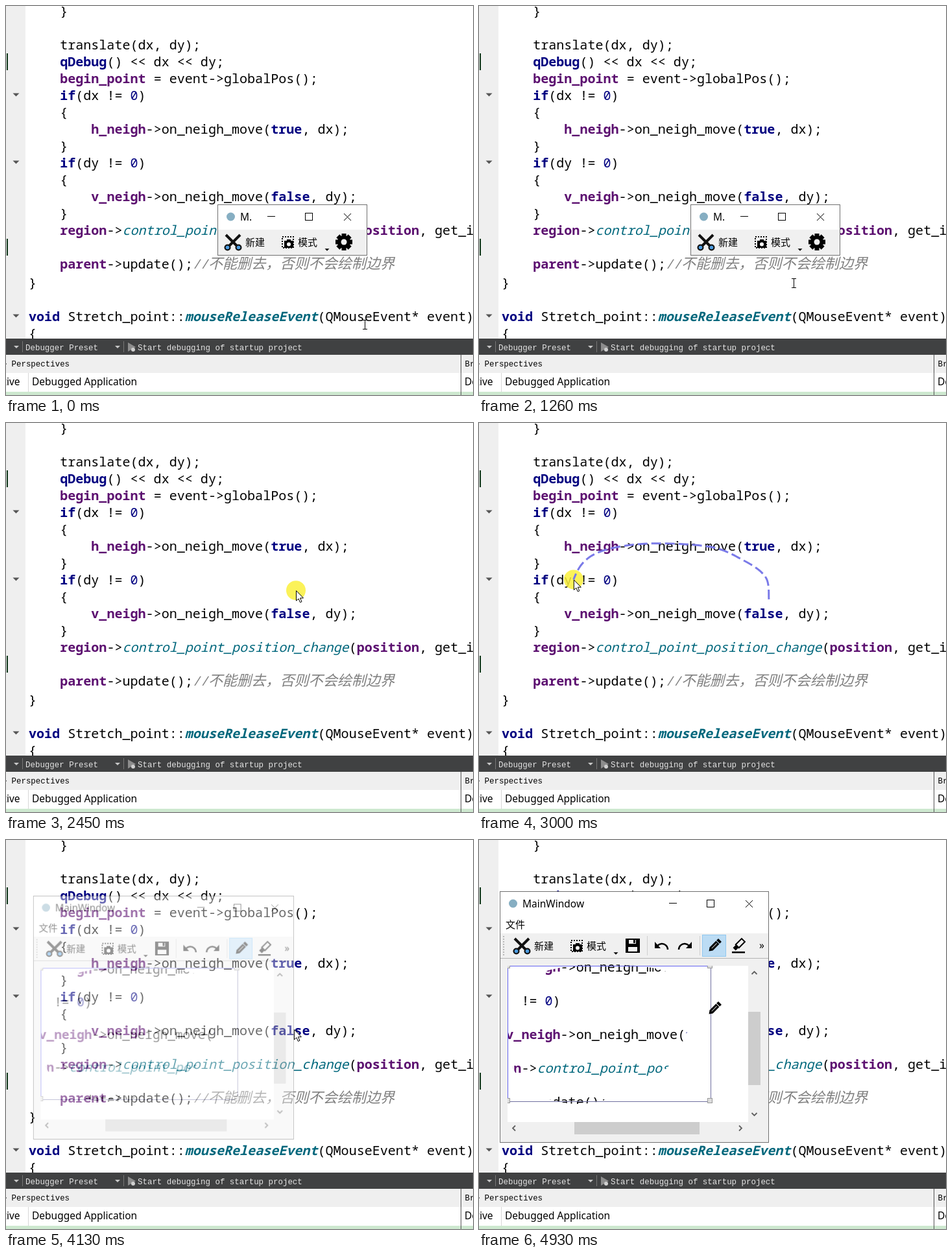
These frames come from a looping animation (720 by 600 pixels, 5.33 s). An HTML page with a canvas:

```html
<!DOCTYPE html>
<html lang="en">
<head>
<meta charset="utf-8">
<title>Screen cut-out</title>
<style>
html, body { margin: 0; width: 100%; height: 100%; overflow: hidden; background: #fff; }
canvas { display: block; width: 720px; height: 600px; }
</style>
</head>
<body>
<canvas id="stage" width="720" height="600"></canvas>
<script>
const W = 720, H = 600, LOOP = 5330;
const CLICK = 1730, DIM = 1860, PRESS = 2450, DRAW = 2520, DRAWN = 3590, RELEASE = 3860, OPEN = 4050;

const main = document.getElementById('stage').getContext('2d');
const layer = Object.assign(document.createElement('canvas'), { width: W, height: H }).getContext('2d');
let c = main;

const UI = '15.5px "Noto Sans", "Open Sans", sans-serif';
const CJK = '"Noto Sans CJK SC", "Noto Sans CJK JP", "Noto Sans CJK", sans-serif';
const FIXED = '12.45px "Liberation Mono", monospace';
const CODE = '20.07px "Noto Sans Mono", "DejaVu Sans Mono", monospace';
const CELL = 12.04, ROW = 26;

const SOURCE = `    }

    translate(dx, dy);
    qDebug() << dx << dy;
    begin_point = event->globalPos();
    if(dx != 0)
    {
        h_neigh->on_neigh_move(true, dx);
    }
    if(dy != 0)
    {
        v_neigh->on_neigh_move(false, dy);
    }
    region->control_point_position_change(position, get_index());

    parent->update();//不能删去，否则不会绘制边界
}

void Stretch_point::mouseReleaseEvent(QMouseEvent* event)
{`.split('\n');

const TOKEN = new RegExp([
  '(?<method>mouseReleaseEvent)',
  '(?<call>control_point_\\w+)',
  '(?<keyword>\\b(?:if|void|true|false|qDebug)\\b)',
  '(?<field>\\b(?:begin_point|[hv]_neigh|region|position|parent)\\b)',
  '(?<number>\\b0\\b)',
  '(?<comment>//.*)'
].join('|'), 'g');

const STYLES = {
  method: ['italic bold ', '#00677c'],
  call: ['italic ', '#00677c'],
  keyword: ['bold ', '#000080'],
  field: ['bold ', '#5c1070'],
  number: ['', '#000080'],
  comment: ['italic ', '#808080'],
  plain: ['', '#000']
};

const clamp = v => Math.max(0, Math.min(1, v));
const mix = (a, b, u) => a.map((v, i) => v + (b[i] - v) * u);

// Catmull-Rom curve through a few points
function spline(pts, steps = 16) {
  const out = [pts[0]], last = pts.length - 1;
  for (let i = 0; i < last; i++) {
    const [a, b, d, e] = [pts[Math.max(0, i - 1)], pts[i], pts[i + 1], pts[Math.min(last, i + 2)]];
    for (let s = 1; s <= steps; s++) {
      const u = s / steps;
      out.push(b.map((v, k) => v + u / 2 * (d[k] - a[k] +
        u * (2 * a[k] - 5 * v + 4 * d[k] - e[k] + u * (3 * (v - d[k]) + e[k] - a[k])))));
    }
  }
  return out;
}

// The first `share` of a polyline by length
function partial(pts, share) {
  const gap = i => Math.hypot(pts[i][0] - pts[i - 1][0], pts[i][1] - pts[i - 1][1]);
  let left = 0;
  for (let i = 1; i < pts.length; i++) left += gap(i) * share;
  const out = [pts[0]];
  for (let i = 1; i < pts.length && left > 0; i++) {
    out.push(mix(pts[i - 1], pts[i], Math.min(1, left / gap(i))));
    left -= gap(i);
  }
  return out;
}

const FIELD = [385, 366], REST = [407, 375], FIRST = [447, 258], LAST = [414, 284], END = [444, 292];
const OUTLINE = spline([[447, 272], [442, 238], [408, 212], [350, 190], [235, 188], [160, 216],
  [134, 300], [152, 362], [205, 396], [280, 396], [375, 350], LAST]);

// Pointer moves: start, end, target
const MOVES = [
  [70, 930, [490, 432]], [1130, 1260, [485, 427]], [1260, 1660, FIELD], [CLICK, 1920, REST],
  [2060, 2260, FIRST], [PRESS, DRAW, OUTLINE[0]], [DRAWN, DRAWN, LAST], [DRAWN, RELEASE, END],
  [4130, 4930, [355, 269]]
];

function pointer(t) {
  let p = [553, 491];
  for (const [from, to, target] of MOVES) {
    if (t >= from) p = mix(p, target, to > from ? clamp((t - from) / (to - from)) : 1);
  }
  return p;
}

function rect(x, y, w, h, color = '#000') {
  c.fillStyle = color;
  c.fillRect(x, y, w, h);
}

function text(str, x, y, font, color = '#000', align = 'left') {
  c.font = font;
  c.fillStyle = color;
  c.textAlign = align;
  c.fillText(str, x, y);
}

function trace(pts, closed) {
  c.beginPath();
  pts.forEach(([x, y], i) => i ? c.lineTo(x, y) : c.moveTo(x, y));
  if (closed) c.closePath();
}

function poly(pts, color = '#000') {
  trace(pts, true);
  c.fillStyle = color;
  c.fill();
}

function line(pts, color = '#000', width = 1) {
  trace(pts);
  c.strokeStyle = color;
  c.lineWidth = width;
  c.stroke();
}

function box(x, y, w, h, color = '#000', width = 1) {
  c.strokeStyle = color;
  c.lineWidth = width;
  c.strokeRect(x + 0.5, y + 0.5, w - 1, h - 1);
}

function disc(x, y, r, color = '#000') {
  c.beginPath();
  c.arc(x, y, r, 0, 7);
  c.fillStyle = color;
  c.fill();
}

function at(x, y, draw, turn = 0) {
  c.save();
  c.translate(x, y);
  c.rotate(turn);
  draw();
  c.restore();
}

const caret = (x, y, r, color) => poly([[x - r, y - r / 2], [x + r, y - r / 2], [x, y + r / 2]], color);

function codeLine(src, y) {
  let col = 0;
  const put = (str, kind) => {
    const [weight, color] = STYLES[kind], x = 35 + col * CELL;
    const shown = kind === 'comment' ? str.slice(0, 2) : str;
    text(shown, x, y, weight + CODE, color);
    if (kind === 'comment') text(str.slice(2), x + 2 * CELL, y, weight + '22.1px ' + CJK, color);
    col += str.length;
  };
  for (const m of src.matchAll(TOKEN)) {
    put(src.slice(col, m.index), 'plain');
    put(m[0], Object.keys(m.groups).find(k => m.groups[k]));
  }
  put(src.slice(col), 'plain');
}

// The row with the taller comment pushes later rows down
function code() {
  const tall = SOURCE.findIndex(s => s.includes('//'));
  SOURCE.forEach((src, i) => codeLine(src, 15 + i * ROW + (i > tall ? 3 : 0)));
}

function editor() {
  rect(0, 0, W, H, '#fff');
  rect(0, 0, 30, 513, '#efefef');
  code();
  for (const y of [73, 359]) rect(1, y, 2, ROW, '#10381a');
  for (const y of [137, 241, 478]) caret(15.5, y, 5, '#555');

  rect(0, 513, W, 25, '#404142');
  for (const x of [16, 172]) {
    caret(x, 526, 4, '#c8c8c8');
    rect(x + 9, 517, 1, 17, '#777');
  }
  text('Debugger Preset', 30, 531, FIXED, '#e4e4e4');
  poly([[188, 519], [200, 526], [188, 533]], '#8d8d8d');
  disc(196, 530, 3, '#d0d0d0');
  text('Start debugging of startup project', 203, 531, FIXED, '#e4e4e4');

  rect(0, 538, W, 28, '#efefef');
  rect(0, 551, 1, 2, '#777');
  text('Perspectives', 8.5, 556, FIXED);
  text('tive', 21.5, 585, UI, '#000', 'right');
  rect(34, 566, 1, 30, '#d8d8d8');
  text('Debugged Application', 40, 585, UI);
  rect(0, 595, W, 5, '#cde8cf');
  rect(701, 538, 1, 62, '#555');
  text('Br', 707.5, 556, FIXED);
  text('Do', 707, 585, UI);
}

function frame(x, y, w, h, title, bar) {
  const r = x + w, m = y + 19;
  rect(x, y, w, h, '#fff');
  rect(x, y + bar, w, h - bar, '#f0f0f0');
  disc(x + 20.5, m, 6.5, '#86aec2');
  text(title, x + 35, m + 6, UI);
  rect(r - 154, m - 1, 12, 1);
  box(r - 96, m - 6, 12, 12);
  at(r - 30.5, m + 0.5, () => {
    for (const s of [-1, 1]) line([[-5.5, -5.5 * s], [5.5, 5.5 * s]]);
  });
  box(x, y, w, h, '#707070');
}

function scissors() {
  for (const s of [-1, 1]) {
    line([[-11 * s, -11], [6 * s, 6]], '#111', 4);
    disc(8.5 * s, 8.5, 5, '#111');
    disc(8.5 * s, 8.5, 2.8, '#4b9be0');
  }
}

function camera() {
  c.setLineDash([2, 2]);
  box(-8.5, -8.5, 18, 18, '#000', 2);
  c.setLineDash([]);
  rect(-5, -2, 14, 11);
  rect(-1, -4, 6, 3);
  disc(2, 3.5, 3, '#fff');
}

// Shared start of both toolbars, placed by the scissors
function tools(x, y) {
  at(x, y, scissors);
  text('新建', x + 19, y + 6, '15px ' + CJK);
  at(x + 84, y, camera);
  text('模式', x + 100, y + 6, '15px ' + CJK);
  caret(x + 145, y + 12, 3.5);
}

function gear() {
  for (let i = 0; i < 4; i++) {
    c.rotate(Math.PI / 4);
    rect(-3.5, -13, 7, 26);
  }
  disc(0, 0, 10);
  disc(0, 0, 4.5, '#f0f0f0');
}

// Lies along x, tip to the left, before it is turned
function pencil() {
  poly([[-12, 0], [-7, -3.5], [7, -3.5], [7, 3.5], [-7, 3.5]]);
  rect(8, -3.5, 4, 7);
  rect(-6, -0.5, 11, 1, '#ddd');
}

function marker() {
  box(-3, -4, 14, 8, '#000', 2);
  rect(-9, -3, 6, 6);
}

function curl(dir) {
  c.scale(dir, 1);
  c.beginPath();
  c.arc(1, 6, 9, -2.4, 0);
  c.strokeStyle = '#000';
  c.lineWidth = 2.5;
  c.stroke();
  poly([[-10, -6], [-10, 4], [-1, 4]]);
}

function floppy() {
  rect(-11, -11, 22, 22);
  rect(-6, -9, 11, 6, '#f0f0f0');
  rect(1, -9, 3, 5);
  rect(-7, 2, 14, 7, '#f0f0f0');
}

function smallWindow() {
  frame(326, 306, 231, 79, 'M.', 39);
  tools(350, 364);
  at(521, 364, gear);
  box(326, 306, 231, 79, '#707070');
}

const chevron = (x, y, quarter) => at(x, y, () =>
  line([[-4, 2], [0, -2], [4, 2]], '#606060', 1.8), quarter * Math.PI / 2);

function bigWindow() {
  frame(32, 79, 415, 388, 'MainWindow', 65);
  text('文件', 41, 136, '15px ' + CJK);
  for (let y = 148; y < 179; y += 4) rect(37, y, 2, 2, '#b8b8b8');
  tools(66, 163);
  at(237, 163, floppy);
  at(281, 163, () => curl(1));
  at(318, 163, () => curl(-1));
  for (const x of [259, 340]) rect(x, 148, 1, 30, '#cfcfcf');
  rect(344, 146, 37, 34, '#bcdcf4');
  box(344, 146, 37, 34, '#90c8f0');
  at(363, 163, pencil, -Math.PI / 4);
  at(400, 162, marker, -Math.PI / 4);
  rect(390, 172, 20, 2.5);
  text('»', 432, 168, UI);
  rect(33, 182, 413, 1, '#b4b4b4');

  rect(44, 194, 371, 241, '#fff');
  at(-90, 6, () => {
    trace(OUTLINE, true);
    c.clip();
    code();
  });
  box(44, 194, 314, 210, '#7070a0');
  line([[44.5, 403.5], [44.5, 194.5], [357.5, 194.5]], '#6464f0');
  c.save();
  c.beginPath();
  c.rect(44, 194, 371, 241);
  c.clip();
  for (const x of [44, 356]) {
    for (const y of [194, 402]) {
      rect(x - 4, y - 4, 8, 8, '#ddd');
      box(x - 4, y - 4, 8, 8, '#999');
    }
  }
  c.restore();

  rect(415, 265, 19, 113, '#cdcdcd');
  rect(147, 435, 193, 19, '#cdcdcd');
  chevron(424.5, 205, 0);
  chevron(424.5, 423, 2);
  chevron(54, 444.5, 3);
  chevron(403, 444.5, 1);
}

// Draws a window as one translucent group scaled about its centre
function faded(draw, alpha, scale, [cx, cy], dx = 0, dy = 0) {
  layer.clearRect(0, 0, W, H);
  c = layer;
  draw();
  c = main;
  c.save();
  c.globalAlpha = alpha;
  c.translate(cx + dx, cy + dy);
  c.scale(scale, scale);
  c.drawImage(layer.canvas, -cx, -cy);
  c.restore();
}

function arrow() {
  const shape = [[0.5, 0.5], [0.5, 16], [4, 12.8], [6.5, 18.5], [9, 17.4], [6.5, 11.8], [11.5, 11.8]];
  poly(shape, '#fff');
  line([...shape, shape[0]]);
}

function beam() {
  rect(0, -7, 1, 15);
  for (const y of [-7, 7]) {
    rect(-3, y, 3, 1);
    rect(1, y, 3, 1);
  }
}

function ink(x, y, t) {
  disc(x, y, 15, 'rgba(250,240,60,.85)');
  const stroke = partial(OUTLINE, clamp((t - DRAW) / (DRAWN - DRAW)));
  if (t > DRAWN) stroke.push([x, y]);
  c.setLineDash([15, 6]);
  line(stroke, 'rgb(122,122,232)', 3);
  c.setLineDash([]);
}

function render(t) {
  editor();

  if (t < CLICK) smallWindow();
  else if (t < DIM) {
    const u = (t - CLICK) / (DIM - CLICK);
    faded(smallWindow, 1 - u, 1 - 0.1 * u, [441, 345]);
  }
  if (t >= DIM && t < PRESS) rect(0, 0, W, H, 'rgba(0,0,0,.125)');

  let [x, y] = pointer(t);
  if (t >= DRAW && t < DRAWN) [x, y] = partial(OUTLINE, (t - DRAW) / (DRAWN - DRAW)).pop();
  if (t >= PRESS && t < RELEASE) ink(x, y, t);

  const u = clamp((t - OPEN) / 250), rest = (1 - u) ** 3;
  if (u >= 1) bigWindow();
  else if (u > 0) faded(bigWindow, clamp(u * 1.3), 1 - 0.1 * rest, [239.5, 273], 11 * rest, 3 * rest);

  const overSmall = x > 326 && x < 557 && y > 306 && y < 385;
  if (t < CLICK && !overSmall) at(Math.round(x), Math.round(y), beam);
  else if (u >= 1 && x < 415) at(x + 8, y - 9, pencil, -Math.PI / 4);
  else at(x, y, arrow);
}

const start = performance.now();
function tick() {
  render((performance.now() - start) % LOOP);
  requestAnimationFrame(tick);
}
tick();
</script>
</body>
</html>
```
